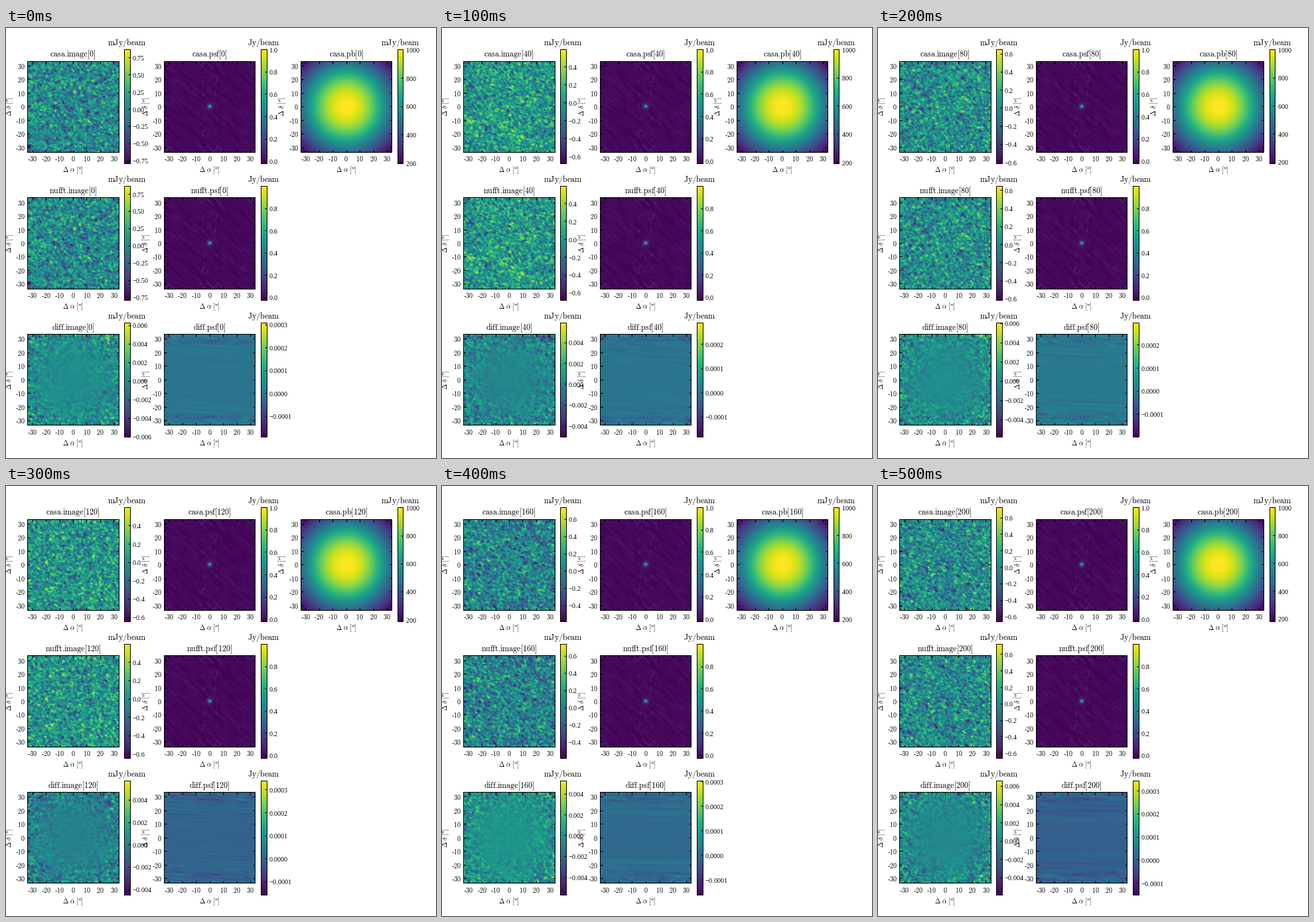
A matplotlib script that plays this animation: 648 by 648 pixels, repeating every 0.6 s.

```python
import numpy as np
import matplotlib.pyplot as plt
from matplotlib.animation import FuncAnimation

plt.rcParams.update({
    "font.family": "Liberation Serif", "font.size": 10,
    "mathtext.fontset": "cm", "mathtext.default": "rm",
    "axes.formatter.use_mathtext": True, "axes.linewidth": 1,
    "xtick.direction": "in", "ytick.direction": "in",
    "xtick.major.width": 1.2, "ytick.major.width": 1.2,
    "xtick.major.pad": 4.2,
})

FRAMES, INTERVAL, CHANNEL_STEP = 6, 100, 40
N, HALF = 128, 33.5
axis = np.linspace(-HALF, HALF, N)
X, Y = np.meshgrid(axis, axis)
R2 = X**2 + Y**2

# Colour limits per channel; the differences are in units of 1e-3 and 1e-4
IMAGE_LIMITS = [(-.79, .864), (-.681, .594), (-.614, .645),
                (-.646, .596), (-.585, .734), (-.66, .722)]
DIFF_LIMITS = [(-6.0, 6.28), (-5.06, 5.91), (-5.77, 6.06),
               (-4.48, 5.72), (-5.7, 5.27), (-5.86, 6.57)]
PSF_DIFF_LIMITS = [(-1.904, 3.084), (-1.811, 2.888), (-1.98, 2.96),
                   (-1.566, 3.387), (-1.612, 3.038), (-1.506, 3.43)]


def texture(seed, long, short, angle):
    """Unit-variance noise smoothed by a rotated elliptical beam (in pixels)."""
    noise = np.random.default_rng(seed).normal(size=(N, N))
    k = np.fft.fftfreq(N)
    kx, ky = np.meshgrid(k, k)
    c, s = np.cos(np.radians(angle)), np.sin(np.radians(angle))
    u, v = kx * c + ky * s, -kx * s + ky * c
    beam = np.exp(-2 * np.pi**2 * ((u * long)**2 + (v * short)**2))
    field = np.fft.ifft2(np.fft.fft2(noise) * beam).real
    return field / field.std()


def mirrored(field):
    return (field + field[::-1, ::-1]) / np.sqrt(2)


def sky(i):
    lo, hi = IMAGE_LIMITS[i]
    return np.clip(texture(10 + i, 1.15, .85, -35) * (hi - lo) / 7.8, lo, hi)


def sky_difference(i):
    lo, hi = np.array(DIFF_LIMITS[i]) * 1e-3
    growth = .012 + .085 * np.clip(R2 / 1100, 0, 1.4)
    return np.clip(texture(30 + i, 1.2, .95, -35) * growth * (hi - lo), lo, hi)


def point_spread(i):
    streaks = mirrored(texture(50, 5, .9, -45))
    ripple = .003 * mirrored(texture(60 + i, 3, .9, -45))
    columns = np.exp(-((abs(X) - 4.5) / 1.8)**2)
    dots = .024 * columns * mirrored(texture(51, 1.3, .8, 60))
    core = .58 * np.exp(-R2 / .9) + .17 * np.exp(-R2 / 5)
    return np.clip(.008 * streaks * abs(streaks) + ripple + dots + core, -.0227, 1)


def psf_difference(i):
    lo, hi = np.array(PSF_DIFF_LIMITS[i]) * 1e-4
    stripes = mirrored(texture(70 + i, 34, .7, -2))
    blotches = mirrored(texture(80 + i, 4, .8, -12))
    edge = np.clip((abs(Y) - 22) / 6, 0, 1)
    field = stripes * (.005 + .013 * (abs(Y) > 12)) + blotches * (.003 + .033 * edge)
    band = np.exp(-((abs(Y) - 28) / 1.3)**2) * np.exp(-(X / 12)**2)
    field -= .07 * band * (1 + blotches)
    return np.clip(field * (hi - lo), lo, hi)


def beam_floor(i):
    return 196 - 3 * i


def primary_beam(i):
    return 1000 * (beam_floor(i) / 1000)**((R2 / R2.max())**1.11)


def tick_text(value, _):
    return ("-" if value < 0 else "") + f"${abs(value):.0f}$"


# row, column, name, unit, data, limits
PANELS = [
    (0, 0, "casa.image", "mJy/beam", sky, lambda i: IMAGE_LIMITS[i]),
    (0, 1, "casa.psf", "Jy/beam", point_spread, lambda i: (-.0227, 1)),
    (0, 2, "casa.pb", "mJy/beam", primary_beam, lambda i: (beam_floor(i), 1000)),
    (1, 0, "nufft.image", "mJy/beam", sky, lambda i: IMAGE_LIMITS[i]),
    (1, 1, "nufft.psf", "Jy/beam", point_spread, lambda i: (-.0227, .9993)),
    (2, 0, "diff.image", "mJy/beam", sky_difference,
     lambda i: np.array(DIFF_LIMITS[i]) * 1e-3),
    (2, 1, "diff.psf", "Jy/beam", psf_difference,
     lambda i: np.array(PSF_DIFF_LIMITS[i]) * 1e-4),
]

fig, axes = plt.subplots(3, 3, figsize=(9, 9), dpi=72)
fig.subplots_adjust(.05, .05, .95, .95, .2, .2)
axes[1, 2].axis("off")
axes[2, 2].axis("off")


def label(greek):
    return rf"$\Delta\ \{greek}\ \text{{[}}$”$\text{{]}}$"


def build(row, column, unit, data, limits):
    ax = axes[row, column]
    lo, hi = limits(0)
    image = ax.imshow(data(0), origin="lower", cmap="viridis", vmin=lo, vmax=hi,
                      extent=(-HALF, HALF, -HALF, HALF))
    ticks = np.arange(-30, 31, 10)
    ax.set(xticks=ticks, yticks=ticks)
    ax.set_xlabel(label("alpha"))
    ax.set_ylabel(label("delta"), labelpad=1.2)
    ax.xaxis.set_major_formatter(tick_text)
    ax.yaxis.set_major_formatter(tick_text)
    ax.tick_params(top=True, right=True)
    bar = fig.colorbar(image, ax=ax)
    bar.ax.set_title(rf"$\text{{{unit}}}$", fontsize=12, y=1, pad=6)
    return image, ax.set_title("", fontsize=12, y=1, pad=6)


artists = [build(row, column, unit, data, limits)
           for row, column, _, unit, data, limits in PANELS]


def update(i):
    for (image, title), (_, _, name, _, data, limits) in zip(artists, PANELS):
        image.set_data(data(i))
        image.set_clim(*limits(i))
        title.set_text(rf"$\text{{{name}[{CHANNEL_STEP * i}]}}$")


anim = FuncAnimation(fig, update, frames=FRAMES, interval=INTERVAL,
                     init_func=lambda: update(0), repeat=True, repeat_delay=0)
plt.show()
```
